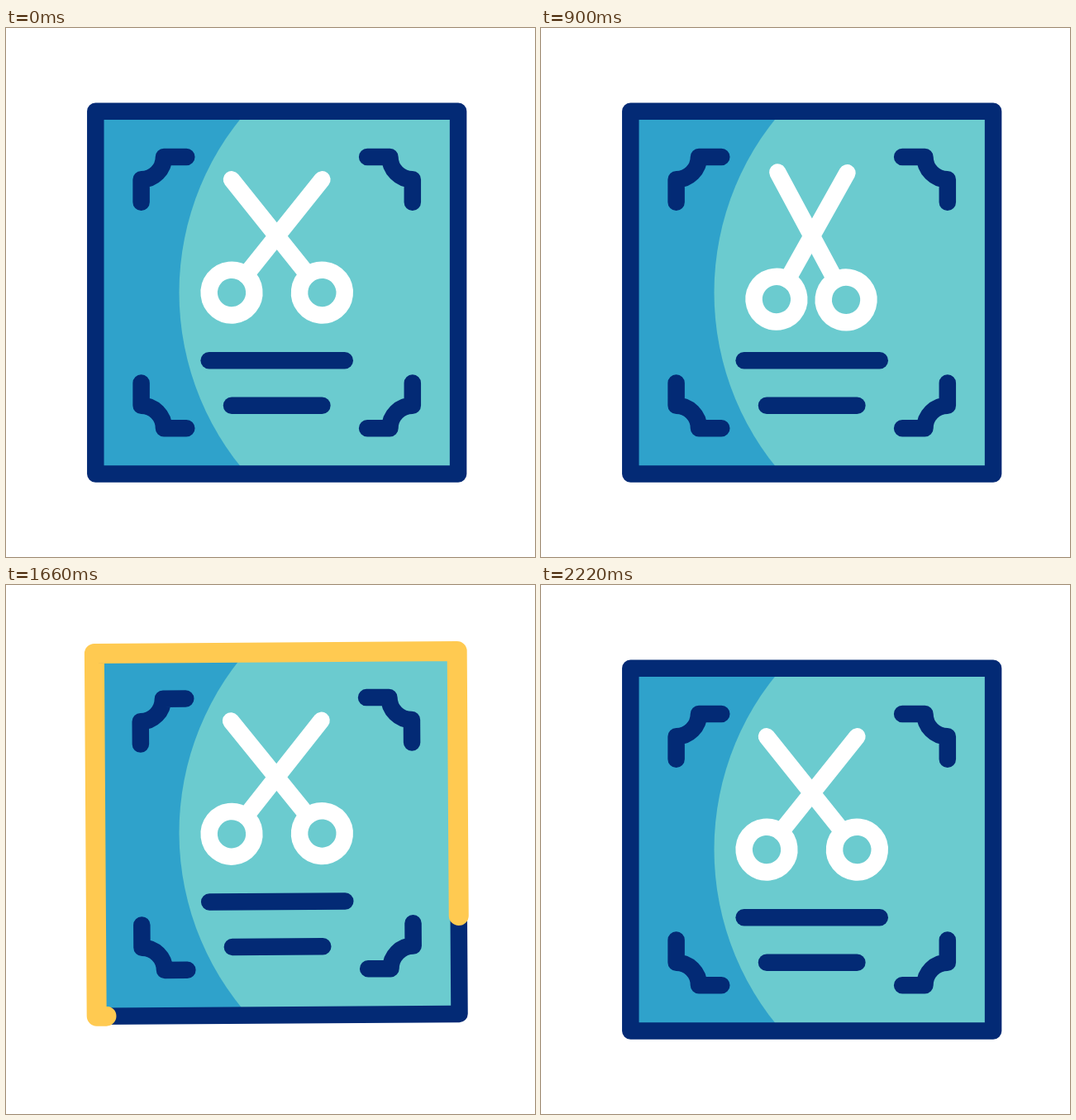
An HTML page with a canvas for the animation above (2.4 s loop, 640 px wide and 640 px high).

```html
<!DOCTYPE html>
<html lang="en">
<head>
<meta charset="utf-8">
<title>Barber card</title>
<style>
  html, body { margin: 0; width: 100%; height: 100%; overflow: hidden; background: #fff; }
  canvas { display: block; width: 640px; height: 640px; }
</style>
</head>
<body>
<canvas id="stage" width="640" height="640"></canvas>
<script>
const ctx = document.getElementById('stage').getContext('2d');
const NAVY = '#032a75', BLUE = '#2fa2cb', TEAL = '#6bcbcf', GOLD = '#ffca51', WHITE = '#fff';
const LOOP = 2400, LAG = 4;
const CX = 327.7, CY = 320.1;
const U = 27.35;      // layout grid
const HALF = 219.4;   // half side of the card outline
const LINE = 20.5, TRIM = 24;

// [time, value] keys, smooth between neighbours
const lift = [[900, 0], [1500, -22], [2200, 0]];
const tilt = [[900, 0], [1500, -10], [1800, 8], [2000, -5], [2200, 0]];
const snip = [[200, 0], [400, 1], [600, 0], [800, 1], [1000, 0]];
const head = [[900, 0], [1800, 1]];
const tail = [[1400, 0], [2200, 1]];

const rad = deg => deg * Math.PI / 180;

function at(keys, t) {
  if (t <= keys[0][0]) return keys[0][1];
  for (let i = 1; i < keys.length; i++) {
    const [t0, v0] = keys[i - 1], [t1, v1] = keys[i];
    if (t < t1) {
      const p = (t - t0) / (t1 - t0);
      return v0 + (v1 - v0) * p * p * (3 - 2 * p);
    }
  }
  return keys[keys.length - 1][1];
}

function stroke(color, width) {
  ctx.strokeStyle = color;
  ctx.lineWidth = width;
  ctx.stroke();
}

function bar(x0, y0, x1, y1, color) {
  ctx.beginPath();
  ctx.moveTo(x0, y0);
  ctx.lineTo(x1, y1);
  stroke(color, LINE);
}

function bracket(sx, sy) {
  ctx.save();
  ctx.scale(sx, sy);
  ctx.beginPath();
  ctx.moveTo(-4 * U, -6 * U);
  ctx.lineTo(-5 * U, -6 * U);
  ctx.arc(-6 * U, -6 * U, U, 0, Math.PI / 2);
  ctx.lineTo(-6 * U, -4 * U);
  stroke(NAVY, LINE);
  ctx.restore();
}

// One half of the scissors; side 1 has its tip at the left
function blade(side, turn) {
  const reach = Math.hypot(2 * U, 2.5 * U);
  ctx.save();
  ctx.translate(0, -2.5 * U);
  ctx.rotate(side * (rad(turn) - Math.atan2(2, 2.5)));
  bar(0, -reach, 0, reach - U, WHITE);
  ctx.beginPath();
  ctx.arc(0, reach, U, 0, Math.PI * 2);
  stroke(WHITE, LINE);
  ctx.restore();
}

function background() {
  ctx.save();
  ctx.beginPath();
  ctx.rect(-HALF, -HALF, 2 * HALF, 2 * HALF);
  ctx.clip();
  ctx.fillStyle = BLUE;
  ctx.fill();
  ctx.beginPath();
  ctx.arc(217.1, 0, 335.3, 0, Math.PI * 2);
  ctx.fillStyle = TEAL;
  ctx.fill();
  ctx.restore();
}

// Gold run round the outline, clockwise from the lower right corner
function goldRun(from, to) {
  if (to <= from) return;
  const len = 8 * HALF;
  ctx.save();
  ctx.beginPath();
  ctx.moveTo(HALF, HALF);
  ctx.lineTo(-HALF, HALF);
  ctx.lineTo(-HALF, -HALF);
  ctx.lineTo(HALF, -HALF);
  ctx.lineTo(HALF, HALF);
  ctx.setLineDash([(to - from) * len, 2 * len]);
  ctx.lineDashOffset = -from * len;
  stroke(GOLD, TRIM);
  ctx.restore();
}

function draw(t) {
  ctx.fillStyle = WHITE;
  ctx.fillRect(0, 0, 640, 640);
  ctx.save();
  ctx.lineCap = ctx.lineJoin = 'round';
  ctx.translate(CX, CY + at(lift, t));
  ctx.rotate(rad(at(tilt, t)));

  background();
  ctx.beginPath();
  ctx.rect(-HALF, -HALF, 2 * HALF, 2 * HALF);
  stroke(NAVY, LINE);

  for (const sx of [-1, 1]) for (const sy of [-1, 1]) bracket(sx, sy);
  bar(-3 * U, 3 * U, 3 * U, 3 * U, NAVY);
  bar(-2 * U, 5 * U, 2 * U, 5 * U, NAVY);

  const s = at(snip, t);
  blade(1, 20 * s);
  blade(-1, 18 * s);

  goldRun(at(tail, t), at(head, t));
  ctx.restore();
}

const start = performance.now();
function tick() {
  draw((performance.now() - start) % LOOP - LAG);
  requestAnimationFrame(tick);
}
tick();
</script>
</body>
</html>
```
